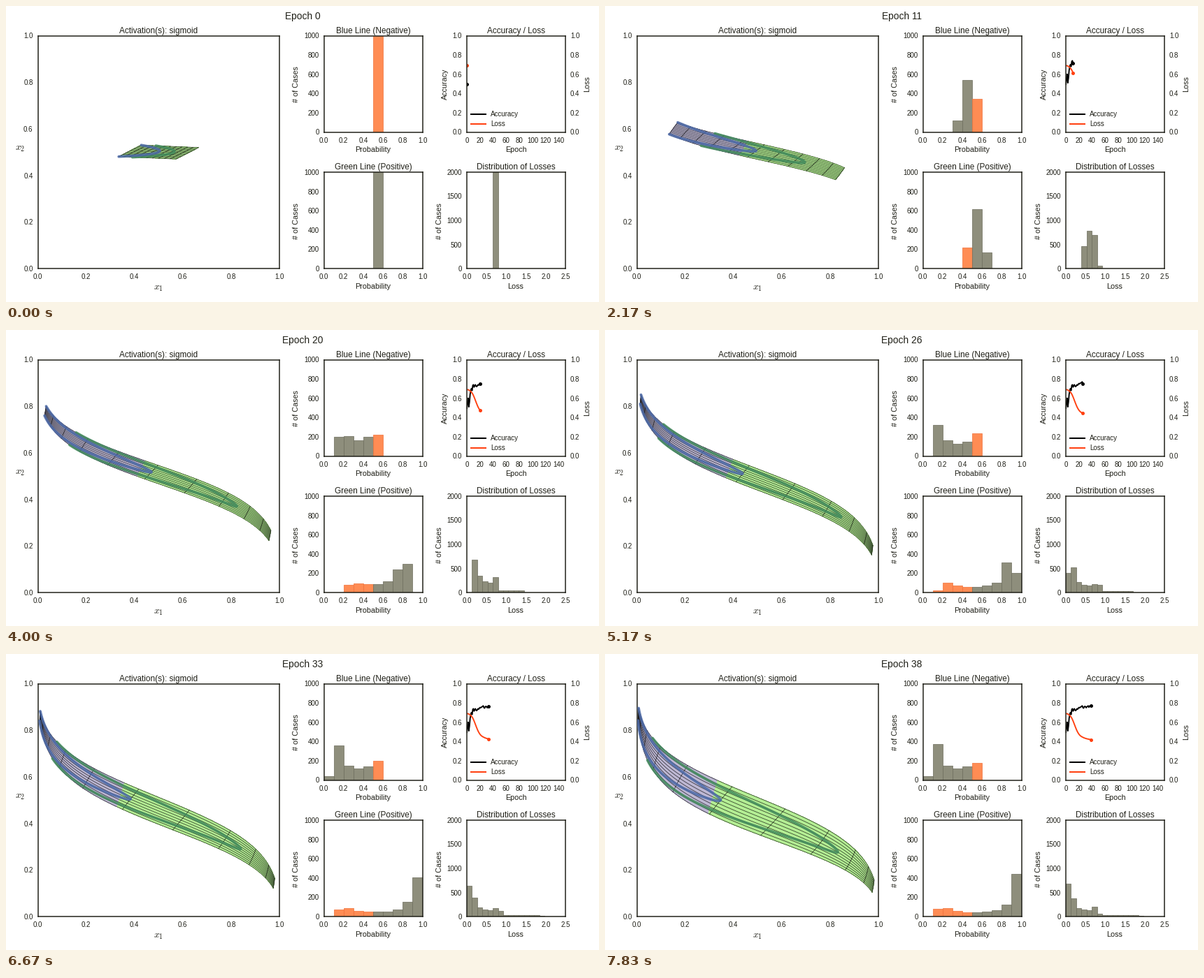
Animation of 848 by 424 pixels, one loop 8000 ms. Source, as a matplotlib script:

```python
import numpy as np
import matplotlib.pyplot as plt
from matplotlib.animation import FuncAnimation
from matplotlib.lines import Line2D

W, H, DPI = 848, 424, 100
FRAMES, LOOP_MS, EPOCHS = 48, 8000, 40
PX = 72 / DPI  # points per pixel

INK = "#1e1e16"
GRAY, GRAY_EDGE = "#8e8e7c", "#6c6c5c"
ORANGE, ORANGE_EDGE = "#ff8c54", "#f0703a"
RED = "#ff4010"
BLUE, GREEN = "#4c6aa8", "#418a5c"
PURPLE_FILL, GREEN_FILL = "#bdb7d3", "#b4ee94"

plt.rcParams.update({
    "font.family": "Liberation Sans",
    "mathtext.fontset": "cm",
    "text.color": INK,
    "axes.edgecolor": INK,
    "axes.linewidth": 1.5 * PX,
    "xtick.color": INK,
    "ytick.color": INK,
})

# Network weights at a few epochs: hidden unit 1, hidden unit 2, output.
KEYS = np.array([0, 11, 20, 26, 30, 36, 39])
WEIGHTS = np.array([
    [0, -.028, -.12, -.25, -.374, -.575, -.667],       # bias 1
    [.198, .138, .11, .11, .115, .18, .22],            # x1 -> 1
    [-.488, -1.70, -3.32, -3.9, -4.1, -4.4, -4.5],     # x2 -> 1
    [0, .019, .068, .04, .024, .005, -.012],           # bias 2
    [.099, .106, .118, .14, .15, .21, .25],            # x1 -> 2
    [.021, .396, 1.20, 1.55, 1.73, 1.88, 1.93],        # x2 -> 2
    [.08, 1.48, 3.31, 4.3, 4.8, 5.35, 5.6],            # 1 -> output
    [0, -.85, -1.71, -1.6, -1.65, -1.5, -1.5],         # 2 -> output
    [0, -.218, -.51, -.805, -.864, -.97, -.97],        # output bias
])
ACCURACY = [.495, .55, .60, .51, .56, .64, .68, .70, .68, .73,
            .74, .715, .73, .74, .725, .72, .73, .74, .735, .745,
            .753, .75, .755, .76, .765, .77, .752, .745, .76, .765,
            .76, .75, .76, .765, .77, .755, .768, .764, .77, .767]
LOSS_KEYS = np.array([0, 3, 6, 9, 11, 14, 17, 20, 26, 30, 36, 39])
LOSS_VALS = np.array([.69, .685, .67, .643, .613, .56, .51, .475,
                      .443, .432, .422, .418])


def hermite(keys, vals, t):
    """Smooth curve through (keys, vals) evaluated at t."""
    slope = np.gradient(vals, keys)
    i = int(np.clip(np.searchsorted(keys, t, side="right") - 1, 0, len(keys) - 2))
    d = keys[i + 1] - keys[i]
    s = (t - keys[i]) / d
    return ((1 + 2 * s) * (1 - s) ** 2 * vals[i] + s * (1 - s) ** 2 * d * slope[i]
            + s * s * (3 - 2 * s) * vals[i + 1] + s * s * (s - 1) * d * slope[i + 1])


def sigmoid(z):
    return 1 / (1 + np.exp(-z))


def forward(w, x1, x2):
    """Hidden activations and output probability."""
    h1 = sigmoid(w[0] + w[1] * x1 + w[2] * x2)
    h2 = sigmoid(w[3] + w[4] * x1 + w[5] * x2)
    return h1, h2, sigmoid(w[6] * h1 + w[7] * h2 + w[8])


LOSS = [hermite(LOSS_KEYS, LOSS_VALS, e) for e in range(EPOCHS)]
LINE_X = np.linspace(-1, 1, 1000)
TICKS = np.linspace(-1, 1, 11)
FINE = np.linspace(-1, 1, 61)
MESH = np.meshgrid(FINE, FINE)
P_BINS = np.linspace(0, 1, 11)
L_BINS = np.linspace(0, 2.5, 20)

fig = plt.figure(figsize=(W / DPI, H / DPI), dpi=DPI, facecolor="white")


def label(x, y, text, size, **kw):
    return fig.text(x / W, 1 - y / H, text, fontsize=size * PX,
                    **{"ha": "center", "va": "baseline", **kw})


def side_label(x, y, text):
    label(x, y, text, 10.7, rotation=90, va="center")


def panel(left, top, right, bottom, title, xticks, yticks, xmax, fmt=("%.1f", "%.1f")):
    ax = fig.add_axes([left / W, 1 - bottom / H, (right - left) / W, (bottom - top) / H])
    ax.set(xlim=(0, xmax), ylim=(0, yticks[-1]))
    ax.set_xticks(xticks, [fmt[0] % t for t in xticks])
    ax.set_yticks(yticks, [fmt[1] % t for t in yticks])
    ax.tick_params(length=0, pad=7 * PX, labelsize=9.75 * PX)
    label((left + right) / 2, top - 4, title, 11.7)
    return ax


fifths = np.linspace(0, 1, 6)
counts = np.arange(0, 1001, 200)
space = panel(45.5, 42.5, 391, 376, "Activation(s): sigmoid", fifths, fifths, 1)
neg = panel(454.5, 42.5, 595.5, 180.5, "Blue Line (Negative)", fifths, counts, 1, ("%.1f", "%d"))
pos = panel(454.5, 238, 595.5, 376, "Green Line (Positive)", fifths, counts, 1, ("%.1f", "%d"))
curve = panel(659, 42.5, 800, 180.5, "Accuracy / Loss", np.arange(0, 141, 20), fifths, 150,
              ("%d", "%.1f"))
curve.tick_params(labelright=True)
dist = panel(659, 238, 800, 376, "Distribution of Losses", np.linspace(0, 2.5, 6),
             np.arange(0, 2001, 500), 2.5, ("%.1f", "%d"))

label(218.5, 407, "$x_1$", 14)
label(20, 207, "$x_2$", 14)
for x, y, text in [(525, 209, "Probability"), (525, 405, "Probability"),
                   (729, 209, "Epoch"), (729, 405, "Loss")]:
    label(x, y, text, 10.7)
for x, y, text in [(415, 112, "# of Cases"), (415, 308, "# of Cases"),
                   (620, 308, "# of Cases"), (628, 112, "Accuracy"), (831, 112, "Loss")]:
    side_label(x, y, text)
for y, text, color in [(155, "Accuracy", "black"), (169, "Loss", RED)]:
    fig.add_artist(Line2D([665 / W, 686 / W], [1 - y / H] * 2, color=color, lw=2 * PX))
    label(693, y + 3.5, text, 9.75, ha="left")
heading = label(424, 19, "", 13.8)


def bars(ax, edges, wrong=()):
    """Empty histogram; bars whose index is in wrong are orange."""
    n = len(edges) - 1
    fill = [ORANGE if i in wrong else GRAY for i in range(n)]
    edge = [ORANGE_EDGE if i in wrong else GRAY_EDGE for i in range(n)]
    return ax.bar(edges[:-1], np.zeros(n), np.diff(edges), align="edge",
                  color=fill, edgecolor=edge, linewidth=0.7 * PX)


def set_bars(rects, values, edges):
    for rect, n in zip(rects, np.histogram(values, edges)[0]):
        rect.set_height(n)
        rect.set_visible(n > 0)


neg_bars = bars(neg, P_BINS, range(5, 10))
pos_bars = bars(pos, P_BINS, range(5))
loss_bars = bars(dist, L_BINS)

grid = [space.plot([], [], color="black", lw=0.75 * PX, alpha=0.75, zorder=2)[0]
        for _ in range(2 * len(TICKS))]
paths = [space.plot([], [], color=c, lw=3.8 * PX, alpha=0.85, zorder=3,
                    solid_capstyle="round")[0] for c in (GREEN, BLUE)]
acc_line, = curve.plot([], [], color="black", lw=1.9 * PX)
loss_line, = curve.plot([], [], color=RED, lw=1.9 * PX)
acc_dot, = curve.plot([], [], "o", color="black", ms=5 * PX, mew=0)
loss_dot, = curve.plot([], [], "o", color=RED, ms=5 * PX, mew=0)
shade = []


def update(frame):
    epoch = int(frame * EPOCHS / FRAMES + 0.5)
    w = [hermite(KEYS, row, epoch) for row in WEIGHTS]
    heading.set_text(f"Epoch {epoch}")

    while shade:
        shade.pop().remove()
    shade.append(space.contourf(*forward(w, *MESH), levels=[0, 0.5, 1],
                                colors=[PURPLE_FILL, GREEN_FILL], zorder=1))
    for i, t in enumerate(TICKS):
        fixed = np.full_like(FINE, t)
        grid[2 * i].set_data(*forward(w, fixed, FINE)[:2])
        grid[2 * i + 1].set_data(*forward(w, FINE, fixed)[:2])

    g1, g2, g_prob = forward(w, LINE_X, LINE_X ** 2 - 0.5)
    b1, b2, b_prob = forward(w, LINE_X, LINE_X ** 2)
    paths[0].set_data(g1, g2)
    paths[1].set_data(b1, b2)

    set_bars(neg_bars, b_prob, P_BINS)
    set_bars(pos_bars, g_prob, P_BINS)
    set_bars(loss_bars, -np.log(np.r_[1 - b_prob, g_prob]), L_BINS)

    span = np.arange(epoch + 1)
    for line, dot, vals in [(acc_line, acc_dot, ACCURACY), (loss_line, loss_dot, LOSS)]:
        line.set_data(span, vals[:epoch + 1])
        dot.set_data([epoch], [vals[epoch]])
    return []


anim = FuncAnimation(fig, update, frames=FRAMES, init_func=lambda: update(0),
                     interval=LOOP_MS / FRAMES, repeat=True, repeat_delay=0)
plt.show()
```
